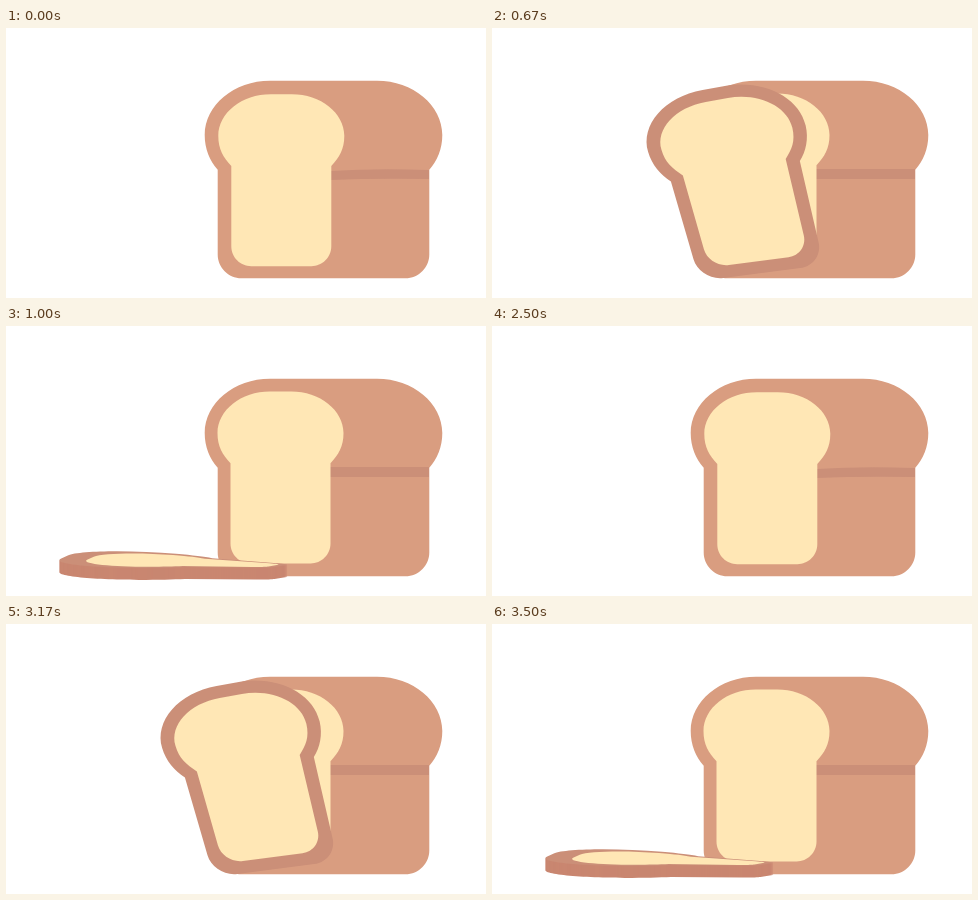
Animation of 480x270 px, one loop 5.01 s. Source, as an HTML page with a canvas:

```html
<!DOCTYPE html>
<html lang="en">
<head>
<meta charset="utf-8">
<title>Bread slice</title>
<style>
  html, body { margin: 0; width: 100%; height: 100%; overflow: hidden; background: #fff; }
  canvas { display: block; width: 100vw; height: 100vh; }
</style>
</head>
<body>
<canvas width="480" height="270"></canvas>
<script>
const ctx = document.querySelector('canvas').getContext('2d');

const LOOP = 5010, CYCLE = 2500, FALL_START = 370, STEP = 100 / 3;
const TIP_STEP = 14, LAST_STEP = 19;
const THICKNESS = 12, FLAT_DEPTH = .5;
const CRUST = [217, 157, 128], RIM = [203, 143, 120], SIDE = [201, 134, 112], CRUMB = [255, 231, 181];

const rgb = c => `rgb(${c.map(Math.round)})`;
const mix = (a, b, k) => a.map((v, i) => v + (b[i] - v) * k);

// Bread outline, inset by d; the right half mirrors the left around mirror / 2.
function bread(d, mirror) {
  const edge = 198 + d, neck = 211 + d, top = 52 + d, bottom = 251 - d;
  const neckY = 142 - d * .35, r = 24 - d * .3;
  const flip = pts => pts.map(([x, y]) => [mirror - x, y]).reverse();
  const crown = [
    [neck, neckY], [edge + 5, neckY - 9], [edge, 121], [edge, 107],
    [edge, 107 - .55 * (107 - top)], [264 - .55 * (264 - edge), top], [264, top]
  ];
  const foot = [
    [neck + r, bottom], [neck + r * .45, bottom], [neck, bottom - r * .45], [neck, bottom - r]
  ];
  return [...crown, ...flip(crown), ...flip(foot), ...foot];
}

function fillBread(pts, color, dx = 0, dy = 0) {
  let i = 0;
  const take = n => pts.slice(i, i += n).flatMap(([x, y]) => [x + dx, y + dy]);
  ctx.fillStyle = rgb(color);
  ctx.beginPath();
  ctx.moveTo(...take(1));
  for (const kind of 'CCLCCLCLC') {
    if (kind === 'C') ctx.bezierCurveTo(...take(3));
    else ctx.lineTo(...take(1));
  }
  ctx.fill();
}

const loaf = bread(.7, 635), rim = bread(.7, 549), crumb = bread(13.5, 549);

// Slice corners (top left, top right, bottom right, bottom left) as it tips over.
const UPRIGHT = [[198, 52], [351, 52], [351, 251], [198, 251]];
const LEANING = [[140.5, 74], [302.5, 44.5], [345.5, 236], [194.5, 255.5]];
const TIPPED = [[47, 176], [166, 157], [318, 237], [202, 243]];
const FLAT = [[33, 242], [81, 220], [287, 238], [263, 242]];
const LEAN_AT = (2 / 3) ** 3;

// Smooth curve through the first three poses.
function tippedCorners(q) {
  const a = (q - LEAN_AT) * (q - 1) / LEAN_AT;
  const b = q * (q - 1) / (LEAN_AT * (LEAN_AT - 1));
  const c = q * (q - LEAN_AT) / (1 - LEAN_AT);
  return UPRIGHT.map((p, i) => p.map((v, j) => a * v + b * LEANING[i][j] + c * TIPPED[i][j]));
}

// Maps upright points into the corners; depth stretches the crown end.
function project(pts, [tl, tr, br, bl], depth) {
  return pts.map(([x, y]) => {
    const u = (x - 198) / 153, h = (251 - y) / 199;
    return mix(mix(bl, br, u), mix(tl, tr, u), h * (1 - depth) / (1 - depth * h));
  });
}

// The resting loaf has a slightly bowed band and a nudged crumb.
function drawLoaf(bow) {
  fillBread(loaf, CRUST);
  ctx.fillStyle = rgb(RIM);
  ctx.beginPath();
  ctx.moveTo(324, 141 + 2 * bow);
  ctx.quadraticCurveTo(370, 141 - bow, 423, 141 + bow);
  ctx.lineTo(423, 151);
  ctx.quadraticCurveTo(370, 151 - bow, 324, 151 + bow);
  ctx.fill();
  fillBread(crumb, CRUMB, bow * .8, bow * .8);
}

function drawSlice(step) {
  const tip = Math.min(1, ((step + 1) / (TIP_STEP + 1)) ** 3);
  const landing = Math.max(0, (step - TIP_STEP) / (LAST_STEP - TIP_STEP));
  const flat = 1 - (1 - landing) ** 2.4;
  const corners = tippedCorners(tip).map((p, i) => mix(p, FLAT[i], flat));
  const outer = project(rim, corners, FLAT_DEPTH * flat);

  for (let dy = THICKNESS * flat; dy > 0; dy--) fillBread(outer, SIDE, 0, dy);
  fillBread(outer, mix(CRUST, RIM, Math.min(1, tip / LEAN_AT)));
  fillBread(project(crumb, corners, FLAT_DEPTH * flat), CRUMB);
}

function draw(now) {
  const time = now % LOOP;
  const t = time < CYCLE ? time : time - CYCLE;
  const resting = t < FALL_START;
  ctx.fillStyle = '#fff';
  ctx.fillRect(0, 0, 480, 270);
  drawLoaf(resting ? 1 : 0);
  // Steps land on 10 ms ticks, hence the small lead.
  if (!resting) drawSlice(Math.min(LAST_STEP, Math.floor((t - FALL_START + 7) / STEP)));
}

const start = performance.now();
function tick() {
  draw(performance.now() - start);
  requestAnimationFrame(tick);
}
tick();
</script>
</body>
</html>
```
